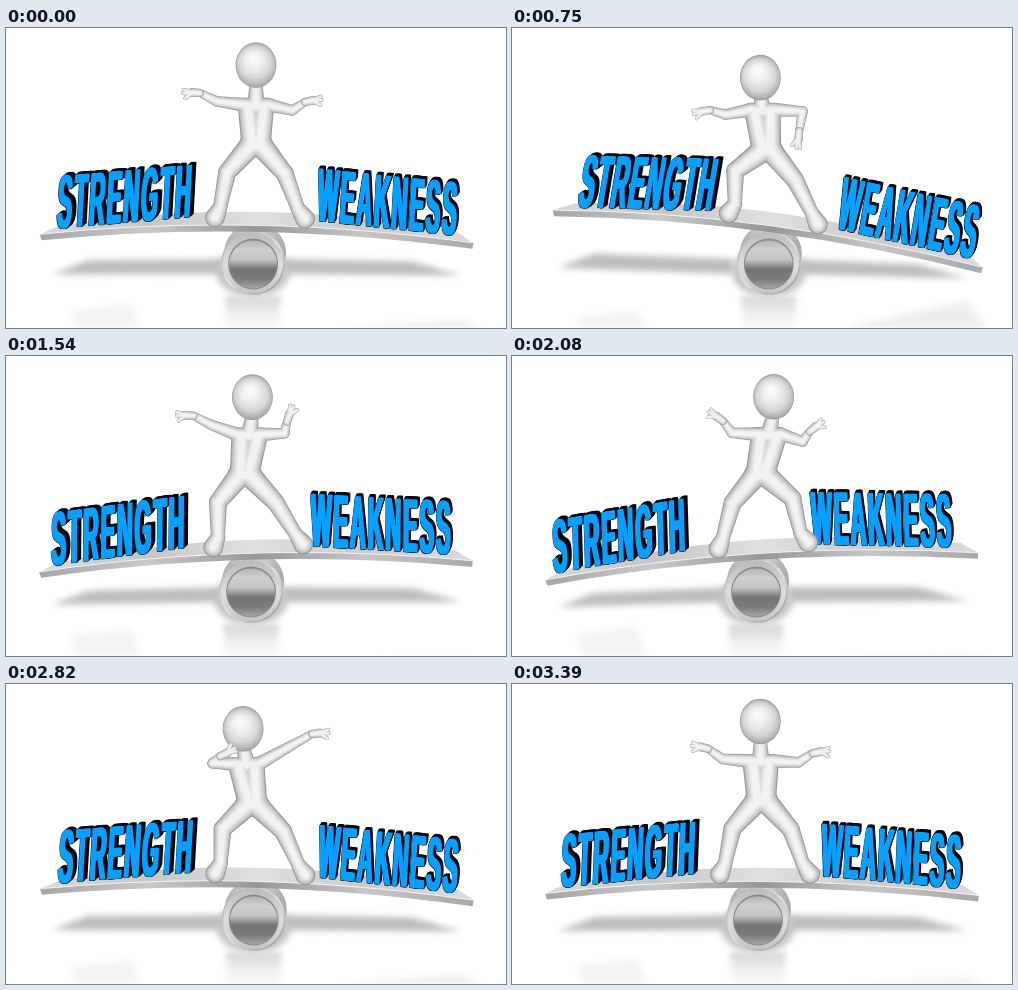
Write an HTML page with a canvas that moves like this. It is 500 px wide and 300 px high and loops after 3.5 s.

```html
<!DOCTYPE html>
<html lang="en">
<head>
<meta charset="utf-8">
<title>Strength and weakness balance</title>
<style>
html, body { margin: 0; width: 100%; height: 100%; overflow: hidden; background: #fff; }
canvas { display: block; }
</style>
</head>
<body>
<canvas id="stage" width="500" height="300"></canvas>
<script>
const ctx = document.getElementById('stage').getContext('2d');
const LOOP = 3500, PICTURES = 30;
const PIVOT = { x: 247, y: 192 };

// Key poses: time, head x y, pelvis x, left wrist x y, right wrist x y
const POSES = [
  [0, 250, 37, 250, 194, 65, 299, 74],
  [750, 248, 50, 254, 198, 83, 286, 104],
  [1240, 241, 44, 245, 193, 83, 268, 92],
  [1540, 247, 41, 239, 188, 59, 282, 65],
  [2080, 263, 40, 251, 214, 67, 300, 77],
  [2390, 252, 31, 251, 204, 72, 300, 66],
  [2820, 237, 45, 246, 214, 72, 306, 50]];

const clamp = (v, low, high) => Math.max(low, Math.min(high, v));

// Board angle in degrees: a slow swing with two overtones
function tiltAt(t) {
  const w = 2 * Math.PI * t / LOOP;
  return 1.15 + 3 * Math.sin(w) + 2.4 * Math.cos(w)
    + .6 * Math.sin(2 * w) - 2.8 * Math.cos(2 * w) + .3 * Math.sin(3 * w);
}

// Smooth cyclic interpolation through the key poses
function poseAt(t) {
  const n = POSES.length;
  const key = j => POSES[(j + n) % n];
  const time = j => key(j)[0] + LOOP * Math.floor(j / n);
  const i = POSES.findLastIndex(k => k[0] <= t);
  const span = time(i + 1) - time(i), u = (t - time(i)) / span, v = 1 - u;
  const slope = (j, c) => (key(j + 1)[c] - key(j - 1)[c]) / (time(j + 1) - time(j - 1));
  return key(i).map((p, c) => p * v * v * (1 + 2 * u) + key(i + 1)[c] * u * u * (3 - 2 * u)
    + span * u * v * (slope(i, c) * v - slope(i + 1, c) * u));
}

function gradient(coords, ...colors) {
  const g = coords.length === 4 ? ctx.createLinearGradient(...coords) : ctx.createRadialGradient(...coords);
  colors.forEach((c, i) => g.addColorStop(i / (colors.length - 1), c));
  return g;
}

function ellipse(x, y, rx, ry, fill) {
  ctx.fillStyle = fill;
  ctx.beginPath();
  ctx.ellipse(x, y, rx, ry, 0, 0, 7);
  ctx.fill();
}

function polygon(fill, ...points) {
  ctx.fillStyle = fill;
  ctx.beginPath();
  points.forEach(p => ctx.lineTo(...p));
  ctx.fill();
}

// Each part is a tapered capsule [from, to, radius, radius]; the parts blend together.
function soft(parts) {
  const layers = 8, quarter = Math.PI / 2;
  for (let k = 0; k < layers; k++) {
    const size = 1 - k * .1, grey = 150 + 92 * Math.sqrt(k / (layers - 1));
    ctx.fillStyle = `rgb(${grey},${grey},${grey})`;
    for (const [a, b, ra, rb] of parts) {
      const dir = Math.atan2(b[1] - a[1], b[0] - a[0]);
      ctx.beginPath();
      ctx.arc(...a, ra * size, dir + quarter, dir + 3 * quarter);
      ctx.arc(...b, rb * size, dir - quarter, dir + quarter);
      ctx.fill();
    }
  }
}

function drawFloor(x, tilt) {
  ctx.save();
  ctx.filter = 'blur(3px)';
  polygon('#bdbdbd', [46, 247 - tilt], [82, 233 - tilt], [222, 231], [222, 246]);
  polygon('#bdbdbd', [276, 231], [406, 233 + tilt / 2], [456, 247 + tilt / 2], [276, 246]);
  ellipse(x, 244, 37, 25, '#c4c4c4');
  polygon(gradient([0, 266, 0, 300], '#cfcfcf', '#ececec', '#f8f8f8'),
    [x - 28, 268], [x + 28, 268], [x + 26, 300], [x - 26, 300]);
  polygon('#f3f3f3', [65, 282 + tilt], [125, 275 + tilt], [135, 300], [70, 300]);
  polygon('#ededed', [330, 300], [455, 294 - tilt * 3], [475, 300]);
  ctx.restore();
}

function drawTube(x) {
  ellipse(x + 2, 225, 31, 30, gradient([x - 30, 0, x + 34, 0], '#aaa', '#ddd', '#a6a6a6'));
  ellipse(x, 235, 32, 32, gradient([x - 26, 205, x + 24, 267], '#b0b0b0', '#e3e3e3', '#989898'));
  ellipse(x, 235, 30, 30.5, gradient([x, 205, x, 267], '#bcbcbc', '#dedede', '#c4c4c4'));
  ellipse(x, 236, 25, 25.5, '#8c8c8c');
  ellipse(x, 236.5, 24, 24,
    gradient([x, 212, x, 261], '#b4b4b4', '#cfcfcf', '#c4c4c4', '#747474', '#7c7c7c', '#a8a8a8'));
}

function drawBoard() {
  const left = [33, 209], right = [467, 212], crest = [247, 184];
  const band = (colors, from, to, bend) => {
    ctx.fillStyle = gradient([33, 0, 467, 0], ...colors);
    ctx.beginPath();
    ctx.moveTo(...left);
    ctx.quadraticCurveTo(...crest, ...right);
    ctx.lineTo(...to);
    ctx.quadraticCurveTo(...bend, ...from);
    ctx.fill();
  };
  band(['#a6a6a6', '#c9c9c9', '#979797', '#c6c6c6', '#a9a9a9'], [35, 215], [466, 218], [247, 191]);
  band(['#dadada', '#c6c6c6', '#e0e0e0', '#cacaca', '#dcdcdc'], [53, 200], [450, 201], [247, 167]);
  ctx.strokeStyle = '#f0f0f0';
  ctx.beginPath();
  ctx.moveTo(...left);
  ctx.quadraticCurveTo(...crest, ...right);
  ctx.stroke();
}

function drawWord(word, x, y, slope, depth) {
  ctx.font = 'bold 76px "Liberation Sans", Arial, sans-serif';
  ctx.letterSpacing = '7px';
  const stamp = (dx, dy, color) => {
    ctx.save();
    ctx.translate(x + dx, y + dy);
    ctx.transform(1, slope, -.04, 1, 0, 0);
    ctx.scale(.285, 1);
    ctx.fillStyle = color;
    ctx.fillText(word, 0, 0);
    ctx.restore();
  };
  for (let k = 5; k >= 0; k--) {
    for (const w of [-1.4, 0, 1.4]) stamp(depth * k / 5 + w, .5 - k * .7, '#04080f');
  }
  for (const w of [-1.1, 0, 1.1]) stamp(w, 0, '#08a0ff');
}

// Joint between two bones; bend runs from -1 to 1 and picks the side it points to.
function joint([ax, ay], [bx, by], upper, lower, bend) {
  const dx = bx - ax, dy = by - ay, d = Math.hypot(dx, dy);
  const along = (upper * upper - lower * lower + d * d) / (2 * d);
  const out = bend * Math.sqrt(Math.max(0, upper * upper - along * along));
  return [ax + (dx * along + dy * out) / d, ay + (dy * along - dx * out) / d];
}

function hand(elbow, wrist, side) {
  const dx = wrist[0] - elbow[0], dy = wrist[1] - elbow[1];
  const droop = .45 * dx / Math.hypot(dx, dy);
  const dir = Math.atan2(dy, dx) + droop;
  const reach = (from, angle, length) => [from[0] + length * Math.cos(angle), from[1] + length * Math.sin(angle)];
  const palm = reach(wrist, dir, 8);
  const fingers = [-.25, .15, .75].map(fan => [palm, reach(palm, dir + side * fan, 9), 3, 1.8]);
  return [[wrist, palm, 4, 4.5], ...fingers];
}

function drawFigure(t, place) {
  const [, hx, hy, px, ...wrists] = poseAt(t);
  const py = hy * .45 + 100, cx = hx * .6 + px * .4, cy = hy * .4 + 59;
  const body = [[[hx, hy + 16], [cx, cy + 4], 6, 9], [[px - 5, py], [px + 5, py], 12, 12]];
  const hands = [];
  [-1, 1].forEach((side, i) => {
    const shoulder = [cx + side * 12, cy + 3], wrist = wrists.slice(i * 2, i * 2 + 2);
    const elbow = joint(shoulder, wrist, 28, 20, side * clamp((wrist[1] - shoulder[1] - 4) / 10, -.5, 1));
    const hip = [px + side * 7, py + 3];
    const ankle = place(252 + side * 39, 180), toe = place(253 + side * 45, 190);
    const knee = joint(hip, ankle, 35, 38, side * .6);
    body.push(
      [[cx + side * 8, cy + 6], [px + side * 4, py - 4], 10, 11],
      [[cx, cy + 4], shoulder, 8, 7], [shoulder, elbow, 7, 5.2], [elbow, wrist, 5.2, 4],
      [hip, knee, 11.5, 9], [knee, ankle, 9, 7], [ankle, toe, 7.5, 10]);
    hands.push(...hand(elbow, wrist, side));
  });
  soft(body);
  ellipse(hx, hy, 20.4, 22.8, '#979797');
  ellipse(hx, hy, 19.8, 22.2, gradient([hx - 3, hy - 7, 2, hx, hy, 23], '#fafafa', '#ededed', '#d6d6d6', '#a0a0a0'));
  soft(hands);
}

function draw(t) {
  const tilt = tiltAt(t), angle = tilt * Math.PI / 180;
  const roll = tilt * (tilt > 0 ? 1.5 : .5), shift = roll * .75, slide = tilt * 2.2 - shift;
  const cos = Math.cos(angle), sin = Math.sin(angle);
  const place = (x, y) => {
    const dx = x - PIVOT.x, dy = y - PIVOT.y;
    return [PIVOT.x + shift + dx * cos - dy * sin, PIVOT.y + dx * sin + dy * cos];
  };
  ctx.fillStyle = '#fff';
  ctx.fillRect(0, 0, 500, 300);
  drawFloor(246 + roll, tilt);
  drawTube(246 + roll);
  ctx.save();
  ctx.translate(PIVOT.x + shift, PIVOT.y);
  ctx.rotate(angle);
  ctx.translate(-PIVOT.x, -PIVOT.y);
  drawBoard();
  drawWord('STRENGTH', 49 + slide, 203, -.1, 4);
  drawWord('WEAKNESS', 309 + slide, 192, .09, 2);
  ctx.restore();
  drawFigure(t, place);
}

const start = performance.now();
function tick() {
  const phase = (performance.now() - start) % LOOP / LOOP;
  draw(Math.floor(phase * PICTURES) * LOOP / PICTURES);
  requestAnimationFrame(tick);
}
tick();
</script>
</body>
</html>
```
